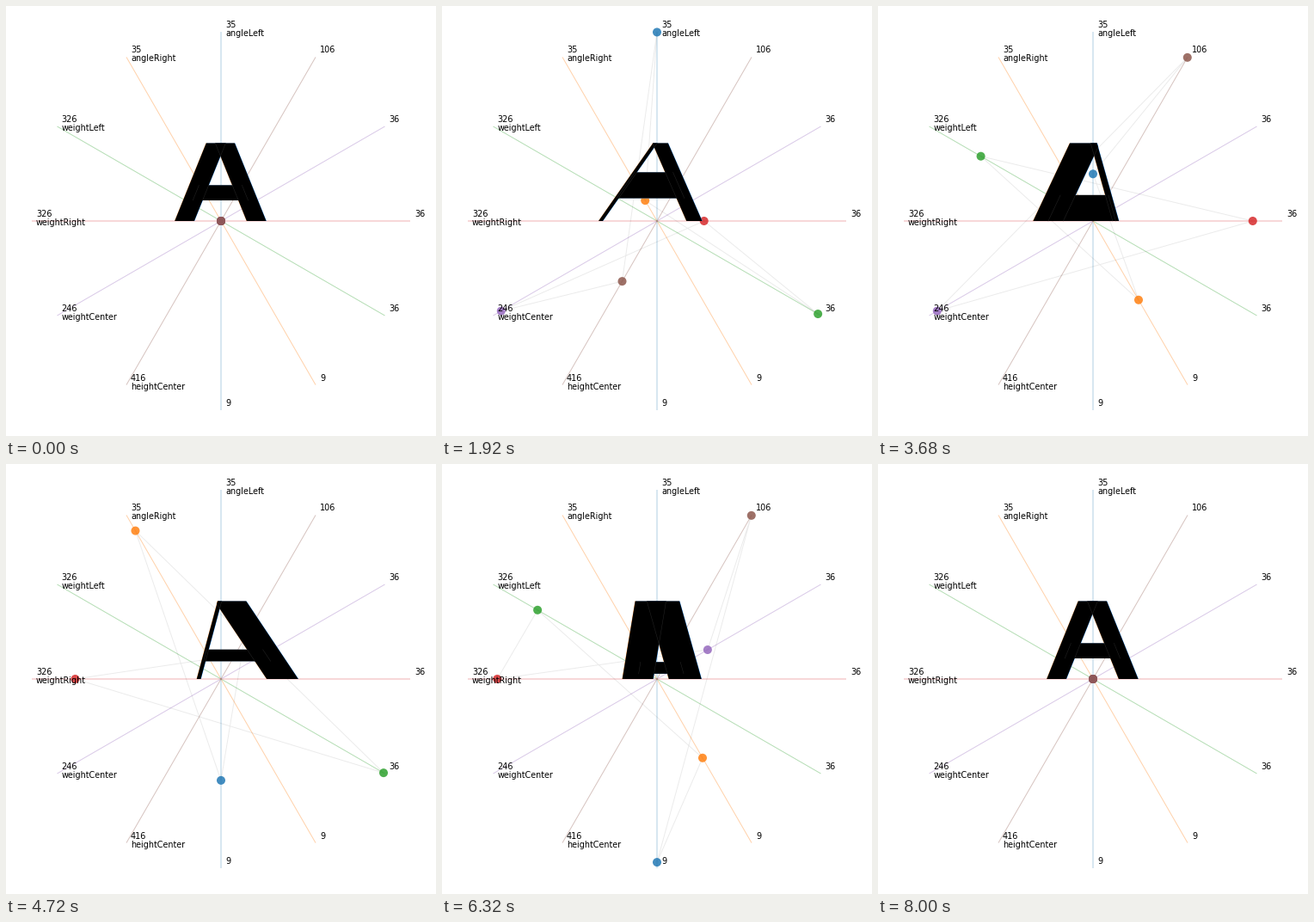
These frames come from a looping animation (500x500 px, 8080 ms). A matplotlib script:

```python
import math

import numpy as np
import matplotlib.pyplot as plt
from matplotlib.animation import FuncAnimation
from matplotlib.patches import Circle, Polygon

SIZE, MID, REACH = 500, 250, 220
STEPS = 100            # steps until every slider is back at the centre
PX = 72 / 100          # points per pixel
TOP, CAP = 159.5, 90.5 # top of the letter and its height
APEX = 249.4
UNIT = 0.125           # pixels per glyph unit

# name, value at the named end, value at the far end, axis angle, colour
PARAMS = [
    ("angleLeft", 35, 9, 90, "#1f77b4"),
    ("angleRight", 35, 9, 120, "#ff7f0e"),
    ("weightLeft", 326, 36, 150, "#2ca02c"),
    ("weightRight", 326, 36, 180, "#d62728"),
    ("weightCenter", 246, 36, 210, "#9467bd"),
    ("heightCenter", 416, 106, 240, "#8c564b"),
]


def on_axis(angle, r):
    a = math.radians(angle)
    return MID + r * math.cos(a), MID - r * math.sin(a)


fig = plt.figure(figsize=(5, 5), dpi=100, facecolor="white")
ax = fig.add_axes([0, 0, 1, 1])
ax.set_xlim(0, SIZE)
ax.set_ylim(SIZE, 0)
ax.axis("off")


def label(x, y, text, px):
    ax.text(x, y, text, fontsize=px * PX, family="DejaVu Sans",
            color="black", va="baseline", ha="left", zorder=6)


for name, high, low, angle, color in PARAMS:
    x1, y1 = on_axis(angle, REACH)
    x2, y2 = on_axis(angle, -REACH)
    ax.plot([x1, x2], [y1, y2], color=color, alpha=0.35, lw=PX,
            snap=False, solid_capstyle="butt", zorder=1)
    label(x1 + 5, y1 - 5, str(high), 9.8)
    label(x1 + 5, y1 + 5, name, 9.6)
    label(x2 + 5, y2 - 5, str(low), 9.8)

web = Polygon(np.zeros((3, 2)), closed=True, fill=False, ec="black",
              alpha=0.08, lw=PX, snap=False, zorder=2)
ax.add_patch(web)

dots = [ax.add_patch(Circle((MID, MID), 5, fc=p[4], ec="none", alpha=0.84,
                            zorder=3)) for p in PARAMS]

# tinted copies give the letter its subpixel colour fringes
LAYERS = [(-0.35, "#ff9a40"), (0.35, "#40a0ff"), (0, "black")]
glyph = []
for shift, color in LAYERS:
    parts = [ax.add_patch(Polygon(np.zeros((3, 2)), closed=True, fc=color,
                                  ec="none", snap=False, zorder=4))
             for _ in range(3)]
    glyph.append((shift, parts))

seams = [ax.plot([], [], color="#262626", lw=0.5 * PX, snap=False,
                 zorder=5)[0] for _ in range(6)]


class Leg:
    """Slanted stem; side is -1 for left and 1 for right."""

    def __init__(self, side, angle, weight):
        self.side = side
        self.tan = math.tan(math.radians(angle))
        self.width = weight * UNIT
        lean = math.cos(math.radians(angle))
        self.top = APEX + side * 0.68 * self.width / lean

    def at(self, depth, inset=0):
        """Point at a depth; inset 0 is the outer edge, 1 the inner."""
        x = self.top + self.side * (self.tan * depth - inset * self.width)
        return x, TOP + depth

    def outline(self, other):
        over = -self.side * (self.at(0, 1)[0] - other.top)
        if over > 0:
            corner = [other.at(0), other.at(over / (self.tan + other.tan))]
        else:
            corner = [self.at(0, 1)]
        return [self.at(CAP), self.at(0)] + corner + [self.at(CAP, 1)], corner[-1]


def letter(angle_l, angle_r, weight_l, weight_r, weight_c, height_c):
    left = Leg(-1, angle_l, weight_l)
    right = Leg(1, angle_r, weight_r)
    shape_l, corner_l = left.outline(right)
    shape_r, corner_r = right.outline(left)

    low = CAP - max(0, height_c - 17 - 0.37 * weight_c) * UNIT
    high = CAP - (height_c - 17 + 0.63 * weight_c) * UNIT
    bar = [left.at(low, 0.5), left.at(high, 0.5),
           right.at(high, 0.5), right.at(low, 0.5)]

    cross = (left.at(0, 1)[0] - right.at(0, 1)[0]) / (left.tan + right.tan)
    meet = left.at(max(cross, 0), 1)
    lines = [(bar[0], bar[1]), (bar[2], bar[3])]
    for leg, corner in ((left, corner_l), (right, corner_r)):
        lines.append((leg.at(low, 1), leg.at(max(high, cross), 1)))
        lines.append((corner, meet) if cross > 0 else (corner, corner))
    return [shape_l, shape_r, bar], lines


def draw(i):
    waves = [math.sin(2 * math.pi * (k + 1) * i / STEPS)
             for k in range(len(PARAMS))]
    spots = [on_axis(p[3], REACH * w) for p, w in zip(PARAMS, waves)]
    values = [(p[1] + p[2]) / 2 + (p[1] - p[2]) / 2 * w
              for p, w in zip(PARAMS, waves)]

    web.set_xy(spots)
    for dot, spot in zip(dots, spots):
        dot.center = spot

    shapes, lines = letter(*values)
    for shift, parts in glyph:
        for part, shape in zip(parts, shapes):
            part.set_xy(np.array(shape) + [shift, 0])
    for seam, (a, b) in zip(seams, lines):
        seam.set_data([a[0], b[0]], [a[1], b[1]])
    return [web, *dots, *(p for _, parts in glyph for p in parts), *seams]


anim = FuncAnimation(fig, draw, frames=STEPS + 1, interval=80,
                     init_func=lambda: draw(0), repeat=True,
                     repeat_delay=0, blit=False)
plt.show()
```
